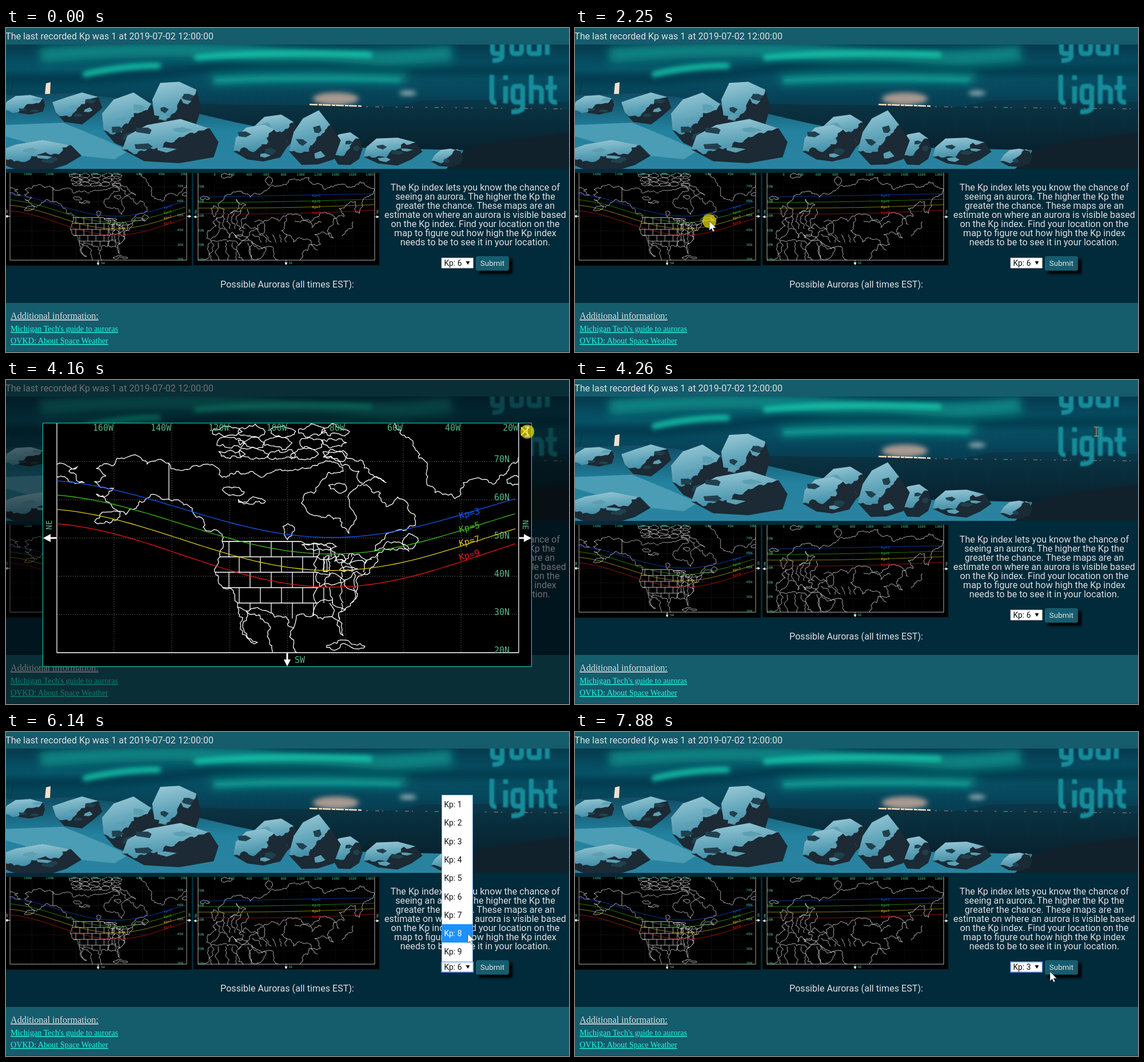
Animation of 985 by 568 pixels, one loop 8 s. Source, as an HTML page:

```html
<!DOCTYPE html>
<html lang="en">
<head>
<meta charset="utf-8">
<title>Aurora forecast</title>
<style>
html,body{margin:0;width:100%;height:100%;overflow:hidden;background:#012a3a}
svg{display:block;width:985px;height:568px}
.ui{font:16.15px Roboto,sans-serif;fill:#dedede}
.mid{text-anchor:middle}
.serif{font:14.2px "Liberation Serif",serif;fill:#1ffae0;text-decoration:underline}
.opt{font:13.9px Roboto,sans-serif;fill:#111}
.map text{font-family:"DejaVu Sans Mono",monospace;stroke:none}
.line{fill:none;stroke:#fff;stroke-linejoin:round}
.grid{fill:none;stroke:#666;stroke-dasharray:1 3}
.neon{fill:none;stroke:#128b99;stroke-width:8.5;stroke-linejoin:round}
</style>
</head>
<body>
<svg id="stage" viewBox="0 0 985 568">
<defs>
  <linearGradient id="sky" x2="0" y2="1">
    <stop stop-color="#053a4e"/><stop offset=".4" stop-color="#06566a"/><stop offset="1" stop-color="#073c51"/>
  </linearGradient>
  <linearGradient id="sea" x2="0" y2="1">
    <stop stop-color="#0a3444"/><stop offset="1" stop-color="#061b27"/>
  </linearGradient>
  <linearGradient id="drift" x2="0" y2="1">
    <stop stop-color="#104d64"/><stop offset=".5" stop-color="#23829f"/><stop offset="1" stop-color="#2a83a0"/>
  </linearGradient>
  <linearGradient id="frost" x2=".25" y2="1">
    <stop stop-color="#9ccbd8"/><stop offset="1" stop-color="#4391aa"/>
  </linearGradient>
  <filter id="soft" x="-20%" y="-100%" width="140%" height="300%"><feGaussianBlur stdDeviation="8"/></filter>
  <filter id="glow" x="-30%" y="-100%" width="160%" height="300%"><feGaussianBlur stdDeviation="4"/></filter>
  <filter id="faint"><feGaussianBlur stdDeviation=".9"/></filter>
  <filter id="shade" x="-20%" y="-30%" width="150%" height="190%"><feGaussianBlur stdDeviation="2.3"/></filter>
  <clipPath id="hero"><path d="M0 29H985V247H0z"/></clipPath>
  <clipPath id="naBox"><path d="M89 76H897V478H89z"/></clipPath>
  <clipPath id="euBox"><path d="M336 254H645V407H336z"/></clipPath>
  <clipPath id="usBox"><path id="usArea"/></clipPath>

  <g id="na" class="map">
    <path d="M65 75H920V503H65z"/>
    <path id="naGrid" class="grid"/>
    <g class="line">
      <g clip-path="url(#naBox)"><path id="naCoast"/></g>
      <path id="states" clip-path="url(#usBox)"/>
      <path d="M285 145V209M378 283H516M89 76V478H897V76"/>
      <path d="M88 277H75M898 277H908M492 479V490" stroke-width="3"/>
    </g>
    <path fill="#fff" d="M65 277 78 270V284zM919 277 906 270V284zM492 502 486 490H498z"/>
  </g>

  <g id="eu" class="map">
    <path d="M328 254H653V416H328z"/>
    <path id="euGrid" class="grid" stroke-width=".5" opacity=".6"/>
    <g class="line" stroke-width=".7">
      <g clip-path="url(#euBox)"><path id="euCoast"/></g>
      <path d="M336 254V407H645V254M336 331H331M645 331H650M490 407V412"/>
    </g>
    <path fill="#fff" d="M328 331 333 328.500V333.500zM653 331 648 328.500V333.500zM490 416 487.500 411H492.500z"/>
  </g>
</defs>

<path fill="#012a3a" d="M0 0H985V568H0z"/>
<path fill="#155c6c" d="M0 0H985V29H0zM0 482H985V568H0z"/>
<path fill="#0c4a5a" d="M0 567H985V568H0z"/>
<text class="ui" x="-1" y="19.500">The last recorded Kp was 1 at 2019-07-02 12:00:00</text>

<g clip-path="url(#hero)">
  <path fill="url(#sky)" d="M0 29H985V140H0z"/>
  <g fill="none" filter="url(#soft)">
    <path stroke="#0a8584" stroke-width="26" d="M60 48Q300 30 460 46T780 44"/>
    <path stroke="#0b7f80" stroke-width="16" d="M360 92Q520 84 700 88"/>
    <path stroke="#053044" stroke-width="14" d="M-20 88Q150 95 300 76T600 68 1000 72"/>
  </g>
  <g fill="none" filter="url(#glow)">
    <path stroke="#17c9ac" stroke-width="9" d="M135 82Q200 66 270 66M330 52Q460 40 640 47"/>
    <path stroke="#11a095" stroke-width="7" d="M365 92Q500 85 690 91"/>
    <ellipse cx="577" cy="124" rx="40" ry="11" fill="#a99a92"/>
    <ellipse cx="703" cy="114" rx="15" ry="4" fill="#9db7bd"/>
  </g>
  <path fill="#0a3547" d="M680 137 730 127 870 126 985 130V145H680z"/>
  <path fill="url(#sea)" d="M0 128 540 136 985 143V247H0z"/>
  <path stroke="#ffe0b8" stroke-width="2.500" d="M531 134 622 137" stroke-dasharray="14 2 6 1"/>
  <path stroke="#b98f72" d="M630 138 985 142" stroke-dasharray="3 13 7 5 2 22"/>
  <path stroke="#10303d" d="M13 92 8 116"/>
  <path fill="#f6dfcd" d="M70 97 78 95 77 116 68 117z"/>
  <path fill="url(#drift)" d="M0 118 120 114 250 130 400 165 620 210 800 214 790 247H0z"/>
  <path fill="#4a9db5" d="M0 170 100 166 168 194 215 215 190 230 110 222 0 190z"/>
  <path fill="#11212c" d="M770 247 803 214 860 199 985 183V247z"/>
  <g id="rocks"></g>
  <g class="neon" filter="url(#faint)">
    <path d="M851 27V40Q851 45 857 45H868V27M868 44V50Q867 57 851 57M885 27V39Q885 45 890 45H897Q902 45 902 39V27M915 27V40Q915 45 920 45H933V27M947 27V47"/>
    <path d="M850 82V126Q851 131 858 131M874 102V132M874 83V91M904 102H891Q887 103 887 108V124Q888 130 893 130H904V101M904 128V140Q902 147 884 147M919 82V133M919 104H931Q937 105 937 111V133M953 84V124Q954 131 964 130M944 104H964"/>
  </g>
</g>

<use href="#na" transform="matrix(.3825 0 0 .3825 -27.04 224.16)" stroke-width="1.700"/>
<path fill="#012a3a" d="M0 247H655V254H0z"/>
<use href="#eu"/>

<g id="intro" class="ui mid"></g>
<text class="ui mid" x="492" y="455">Possible Auroras (all times EST):</text>
<path d="M827 405H886V431H827z" filter="url(#shade)"/>
<rect x="822" y="400" width="58" height="25.500" rx="4" fill="#155c6e"/>
<text class="ui mid" x="851" y="416.500" style="font-size:13.46px">Submit</text>

<rect id="select" x="762" y="403" width="55.500" height="18" fill="#fff"/>
<text id="value" class="opt" x="766.500" y="416.500"></text>
<path d="M804.500 409H811.500L808 415z"/>
<g id="menu">
  <path fill="#fff" stroke="#7ba4dc" d="M762.500 110.500H816.500V403H762.500z"/>
  <rect id="mark" x="763" width="53" height="32.300" fill="#1e90ff"/>
</g>

<text class="serif" x="8" y="510" style="font-size:16.15px;fill:#dedede">Additional information:</text>
<text class="serif" x="8" y="532">Michigan Tech's guide to auroras</text>
<text class="serif" x="8" y="553">OVKD: About Space Weather</text>

<g id="modal">
  <path opacity=".5" d="M0 0H985V568H0z"/>
  <use href="#na" stroke-width="1.300"/>
  <path fill="none" stroke="#25d8cc" d="M64.500 75.500H919.500V502.500H64.500z"/>
  <path stroke="#ddd" stroke-width="2.200" d="M901 83 915 97M915 83 901 97"/>
</g>
<circle id="click" r="12.200" fill="#eee300" opacity=".7"/>
<path id="arrow" fill="#fff" stroke="#222" stroke-width=".6" d="M0 0V16.500L3.800 13 6.300 18.500 9 17.300 6.500 12H12z"/>
<path id="beam" fill="none" stroke-width="1.300" d="M-4 -8H-1L0 -7 1 -8H4M0 -7V7M-4 8H-1L0 7 1 8H4"/>
</svg>

<script>
const $ = id => document.getElementById(id);
function add(parent, tag, attrs, text = "") {
  const el = document.createElementNS("http://www.w3.org/2000/svg", tag);
  for (const key in attrs) el.setAttribute(key, attrs[key]);
  el.textContent = text;
  return parent.appendChild(el);
}
const range = n => [...Array(n).keys()];
let seed = 11;
const rand = () => (seed = seed * 16807 % 2147483647) / 2147483647 - .5;
const points = s => {
  const n = s.split(" ").map(Number);
  return range(n.length / 2).map(i => [n[2 * i], n[2 * i + 1]]);
};
const toPath = p => "M" + p.map(q => q.map(v => v.toFixed(1)).join(" ")).join("L");

// Roughen a segment by repeated midpoint displacement.
function rough(a, b, limit) {
  const dx = b[0] - a[0], dy = b[1] - a[1];
  if (Math.hypot(dx, dy) < limit) return [b];
  const k = rand() * .55;
  const mid = [(a[0] + b[0]) / 2 - dy * k, (a[1] + b[1]) / 2 + dx * k];
  return [...rough(a, mid, limit), ...rough(mid, b, limit)];
}
const jagged = (p, limit) => [p[0], ...p.slice(1).flatMap((q, i) => rough(p[i], q, limit))];
const ring = (cx, cy, rx, ry, n, wild) => range(n).map(i => {
  const a = i / n * 2 * Math.PI, r = 1 + rand() * wild;
  return [cx + rx * r * Math.cos(a), cy + ry * r * Math.sin(a)];
});
function extend(id, d) {
  $(id).setAttribute("d", ($(id).getAttribute("d") || "") + d);
}
const naShore = s => extend("naCoast", toPath(jagged(points(s), 6)));
const euShore = s => extend("euCoast", toPath(jagged(points(s), 3)));
const isle = (id, limit) => (...box) => {
  const p = ring(...box, 7, .4);
  extend(id, toPath(jagged([...p, p[0]], limit)));
};
const naIsle = isle("naCoast", 6), euIsle = isle("euCoast", 3);

// Boulders: dark faces under an uneven snow cap
function rock(cx, cy, rx, ry) {
  const body = ring(cx, cy, rx, ry, 9, .3);
  add($("rocks"), "path", { d: toPath(body) + "z", fill: "#1b2a34" });
  const cap = body.slice(4);
  const edge = jagged([cap[4], [cx + rx * .1, cy - ry * .1], [cx - rx * .2, cy + ry * .4], cap[0]], 7);
  add($("rocks"), "path", { d: toPath([...cap, ...edge]) + "z", fill: "url(#frost)" });
  for (const i of range(4)) {
    const patch = ring(cx + rx * rand() * 1.2, cy + ry * rand() * 1.2, rx * .2, ry * .15, 5, .9);
    add($("rocks"), "path", { d: toPath(patch) + "z", fill: i % 2 ? "#21404e" : "#5d9fb3" });
  }
}
rock(36, 135, 38, 18);
rock(125, 140, 42, 26);
rock(50, 224, 75, 26);
rock(213, 165, 50, 46);
rock(295, 140, 44, 44);
rock(288, 200, 86, 36);
rock(474, 184, 40, 30);
rock(443, 204, 46, 34);
rock(597, 212, 30, 30);
rock(539, 197, 42, 48);
rock(676, 217, 50, 24);
rock(773, 227, 28, 17);

// North America
const us = points("378 283 369 325 380 365 405 398 445 402 470 416 490 415 503 435 508 413 540 411 570 415 590 448 582 408 615 375 612 352 640 328 650 305 630 316 575 318 535 287 516 283");
const usEdge = jagged(us, 6);
$("usArea").setAttribute("d", toPath(usEdge));
extend("naCoast", toPath(usEdge));
naShore("285 146 210 136 158 155 175 168 155 178 188 190 158 200 175 213 200 232 155 248 228 225 247 207 305 213 345 258 378 283");
naShore("285 146 345 148 430 160 475 158 545 150 590 160 549 182 520 205 540 238 585 243 600 269 610 235 605 195 655 198 665 222 685 205 716 255 655 285 645 300 690 285 705 300 650 305");
naShore("680 76 720 125 735 165 785 208 800 180 880 152 897 110");
naShore("555 135 620 140 665 180 620 180 600 150 555 135");
naShore("89 148 125 152 110 160 137 180 89 170");
naShore("405 398 440 460 420 405 466 478");
naShore("503 435 503 465 510 478");
naIsle(708, 282, 14, 13);
naIsle(588, 467, 36, 5);
naIsle(545, 292, 28, 7);
naIsle(561, 320, 7, 14);
naIsle(585, 314, 9, 8);
naIsle(598, 331, 16, 4);
naIsle(400, 196, 20, 6);
naIsle(432, 212, 24, 5);
naIsle(495, 264, 10, 14);
naIsle(582, 188, 17, 7);
naIsle(890, 178, 16, 8);
range(15).forEach(i => naIsle(392 + i % 5 * 46 + rand() * 14, 90 + 20 * Math.floor(i / 5), 24, 9));

// State lines: staggered blocks, smaller and more irregular to the east
for (const row of range(5)) {
  const y = 283 + 27 * row;
  extend("states", `M360 ${y}H545` + toPath(jagged([[545, y], [640, y + 4]], 9)));
  for (const col of range(5)) extend("states", `M${390 + 37 * col + row % 2 * 18} ${y}v27`);
  for (const col of range(5)) {
    const x = 545 + 21 * col;
    extend("states", toPath(jagged([[x, y], [x + rand() * 10, y + 27]], 8)));
  }
}

// Europe and Asia
euShore("382 318 371 308 410 286 447 290 490 275 530 262 590 274 645 283 625 300 618 325 612 305 583 316 592 330 565 352 573 368 556 358 540 362 550 380 518 395 515 407");
euShore("382 318 380 330 362 340 368 347 353 355 351 368 358 371 375 352 390 368 395 358 402 368 415 356 408 352 420 343 440 353 400 362 425 372 388 375 358 372 346 407");
euShore("425 372 437 407 455 386 430 374 455 384 468 387 476 407");
euShore("392 325 408 316 403 300 420 310 405 322 392 325");
euShore("588 365 604 352 608 340");
euShore("435 340 490 330 520 336 565 325 583 345");
euShore("490 332 482 355 533 372 545 390");
euShore("505 338 535 350 552 341");
euIsle(364, 322, 5, 10);
euIsle(446, 352, 6, 12);
euIsle(347, 298, 8, 3);
euIsle(386, 259, 10, 4);
euIsle(460, 268, 6, 7);
for (const i of range(6)) {
  euShore(`${368 + 11 * i} ${332 - 3 * i} ${374 + 9 * i} 352`);
  euShore(`${358 + 13 * i} 376 ${360 + 14 * i} 407`);
  euShore(`${430 + 12 * i} 362 ${446 + 9 * i} 376`);
}

// Graticules and their labels
const label = (map, x, y, text, size, anchor = "middle", fill = "#54b78a", turn = 0) =>
  add($(map), "text", { x, y, fill, "font-size": size, "text-anchor": anchor, transform: `rotate(${turn} ${x} ${y})` }, text);
for (const i of range(8)) {
  label("na", 188 + 101.2 * i, 89, 160 - 20 * i + "W", 15, "end");
  if (i < 7) extend("naGrid", `M${189 + 101.2 * i} 76V478`);
}
for (const i of range(10)) {
  label("eu", 365 + 30.2 * i, 259, i ? 20 * i + "E" : "0", 6);
  extend("euGrid", `M${365 + 30.2 * i} 254V407`);
}
for (const i of range(6)) {
  const lat = 70 - 10 * i + "N";
  label("na", 881, 143.5 + 67 * i, lat, 15, "end");
  extend("naGrid", `M89 ${143 + 67 * i}H897`);
  label("eu", 341, 280 + 25.6 * i, lat, 6);
  extend("euGrid", `M336 ${280 + 25.6 * i}H645`);
}
label("na", 514, 496, "SW", 15);
label("eu", 498, 414, "SE", 6);
for (const side of [-1, 1]) {
  label("na", 492 + 412 * side, 254, "NE", 14, "middle", "#54b78a", 90 * side);
  label("eu", 491 + 157 * side, 322, "NW", 5.5, "middle", "#54b78a", 90 * side);
}

// Visibility limits: a cosine dip in the west, nearly level in the east
["#1557f0", "#3fc01c", "#dccb13", "#f01616"].forEach((stroke, i) => {
  const west = range(82).map(k => {
    const x = 89 + 9.9 * k;
    return [x, 276 + 29 * i - (50.5 + 2 * i) * (1 - Math.cos((x - 570) / 167))];
  });
  const east = range(21).map(k => [336 + 15.45 * k, 296.5 + 9.6 * i - .3 * k + i * Math.sin(k / 20 * Math.PI)]);
  const name = "Kp=" + (3 + 2 * i);
  add($("na"), "path", { d: toPath(west), stroke, fill: "none" });
  add($("eu"), "path", { d: toPath(east), stroke, fill: "none", "stroke-width": .6 });
  label("na", 812, 239 + 24.3 * i, name, 15.5, "middle", stroke, -14);
  label("eu", 543, 296 + 10 * i, name, 6, "middle", stroke);
});

["The Kp index lets you know the chance of", "seeing an aurora. The higher the Kp the",
 "greater the chance. These maps are an", "estimate on where an aurora is visible based",
 "on the Kp index. Find your location on the", "map to figure out how high the Kp index",
 "needs to be to see it in your location."
].forEach((t, i) => add($("intro"), "text", { x: 821, y: 284.5 + 16.15 * i }, t));

const options = range(9).map(i => add($("menu"), "text", { class: "opt", x: 766.5, y: 132 + 32.3 * i }, "Kp: " + (i + 1)));

// Pointer moves in visible steps; a positive bend starts fast, a negative one slowly.
const moves = [
  { from: 1260, to: 1510, steps: 3, x: 293, y: 391 },
  { from: 1760, to: 1890, steps: 2, x: 235, y: 338.5 },
  { from: 3160, to: 3250, steps: 2, x: 904, y: 91 },
  { from: 3670, to: 4000, steps: 4, x: 912, y: 90.5 },
  { from: 4510, to: 5270, steps: 7, x: 809, y: 411 },
  { from: 6140, to: 6640, steps: 5, x: 805, y: 187, bend: .35 },
  { from: 7630, to: 7880, steps: 3, x: 831, y: 420, bend: -.8 }
];
function pointer(t) {
  let x = 879, y = 400;
  for (const m of moves) {
    if (t < m.from) break;
    const gap = (m.to - m.from) / (m.steps - 1);
    const u = Math.min(1, (Math.floor((t - m.from) / gap + .01) + 1) / m.steps);
    const k = u * (1 + (m.bend || 0) * (1 - u));
    x += (m.x - x) * k;
    y += (m.y - y) * k;
  }
  return [x, y];
}
const clicks = [[2250, 2390], [4160, 4260], [5530, 5650], [7270, 7390]];
const within = (t, [a, b]) => t >= a && t < b;
const show = (id, on) => $(id).setAttribute("visibility", on ? "visible" : "hidden");

function draw(t) {
  const [x, y] = pointer(t);
  const modal = within(t, [2390, 4260]), focus = t >= 5650;
  const beam = within(t, [4000, 5270]) && y < 150;
  for (const id of ["arrow", "beam", "click"]) $(id).setAttribute("transform", `translate(${x} ${y})`);
  show("arrow", t >= 880 && !beam);
  show("beam", beam);
  $("beam").setAttribute("stroke", modal ? "#e8e8e8" : "#c58a5c");
  show("click", clicks.some(c => within(t, c)));
  show("modal", modal);
  show("menu", within(t, [5650, 7390]));
  $("value").textContent = t < 7390 ? "Kp: 6" : "Kp: 3";
  $("select").setAttribute("stroke", focus ? "#5b8fe0" : "#a9a9a9");
  $("select").setAttribute("stroke-width", focus ? 1.6 : .7);
  const row = t < 6140 ? 5 : Math.floor((y - 110.8) / 32.3);
  $("mark").setAttribute("y", 110.8 + 32.3 * row);
  options.forEach((o, i) => o.style.fill = i === row ? "#fff" : "#111");
}
const start = performance.now();
function tick() {
  draw((performance.now() - start) % 8000);
  requestAnimationFrame(tick);
}
tick();
</script>
</body>
</html>
```
